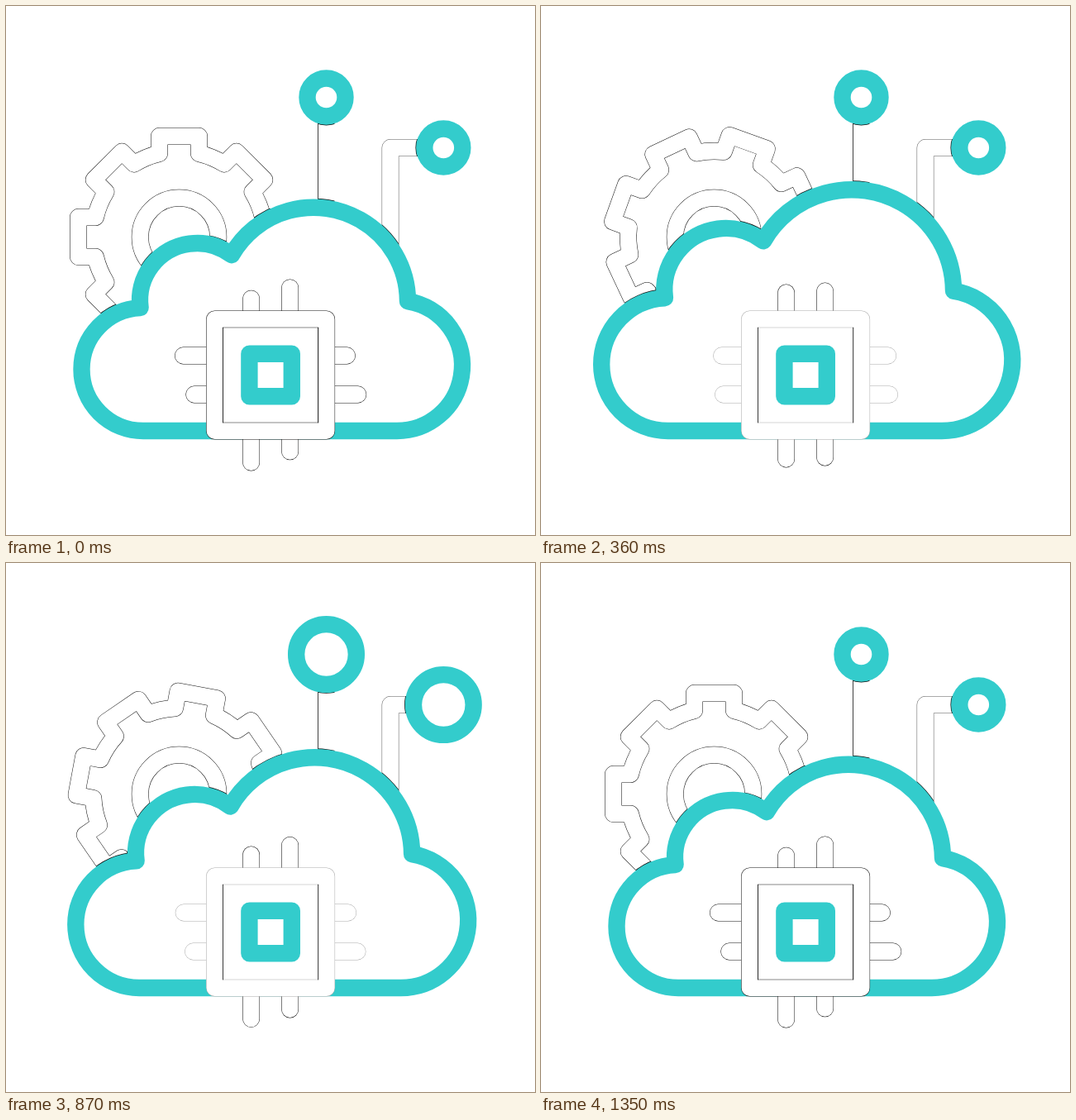
An HTML page with a canvas for the animation above (1410 ms loop, 640 px wide and 640 px high).

```html
<!DOCTYPE html>
<html lang="en">
<head>
<meta charset="utf-8">
<title>Cloud computing</title>
<style>
  html, body { margin: 0; width: 100%; height: 100%; overflow: hidden; background: #fff; }
  canvas { display: block; }
</style>
</head>
<body>
<canvas id="stage" width="640" height="640"></canvas>
<script>
const ctx = document.getElementById('stage').getContext('2d');
const TEAL = '#33cccc', INK = '#111', PALE = '#aaa', WHITE = '#fff';
const LOOP = 1410, STEP = 30, LAST = 1350;
const TAU = Math.PI * 2, QUARTER = TAU / 4;

// Smooth progress from 0 to 1 between two times.
function ease(t, from, to) {
  const k = Math.min(1, Math.max(0, (t - from) / (to - from)));
  return (1 - Math.cos(Math.PI * k)) / 2;
}

// Rises to 1, stays, then falls back to 0.
const swell = (t, up, top, leave, end) => ease(t, up, top) - ease(t, leave, end);

function polyline(...points) {
  const path = new Path2D();
  points.forEach(([x, y]) => path.lineTo(x, y));
  return path;
}

function circle(x, y, r) {
  const path = new Path2D();
  path.arc(x, y, r, 0, TAU);
  return path;
}

function square(half) {
  const path = new Path2D();
  path.rect(-half, -half, 2 * half, 2 * half);
  return path;
}

function stroke(path, color, width) {
  ctx.strokeStyle = color;
  ctx.lineWidth = width;
  ctx.stroke(path);
}

// A white band with a hairline along both edges.
function band(path, color = INK) {
  stroke(path, color, 20.8);
  stroke(path, WHITE, 19.8);
}

// A white shape with a teal border; a dark rim shows only where it overlaps earlier shapes.
function tealShape(path) {
  ctx.globalCompositeOperation = 'source-atop';
  stroke(path, INK, 21.8);
  ctx.globalCompositeOperation = 'source-over';
  ctx.fillStyle = WHITE;
  ctx.fill(path);
  stroke(path, TEAL, 20.4);
}

function gearPath(teeth, root, tip, half) {
  const path = new Path2D(), pitch = TAU / teeth, corner = Math.asin(half / root);
  for (let i = 0; i < teeth; i++) {
    const a = i * pitch, c = Math.cos(a), s = Math.sin(a);
    path.lineTo(tip * c + half * s, tip * s - half * c);
    path.lineTo(tip * c - half * s, tip * s + half * c);
    path.arc(0, 0, root, a + corner, a + pitch - corner);
  }
  path.closePath();
  return path;
}

const gear = gearPath(8, 104, 122, 24);

function drawGear(t) {
  const degrees = 29 * ease(t, 60, 545) - 35 * ease(t, 553, 1165) + 6 * ease(t, 1165, LAST);
  ctx.save();
  ctx.translate(209.5, 279.5);
  band(circle(0, 0, 47.3));
  ctx.rotate(degrees * TAU / 360);
  band(gear);
  ctx.restore();
}

const upLink = polyline([387.5, 262], [387.5, 120]);
const bentLink = polyline([465, 300], [465, 171.5], [510, 171.5]);

// A teal dash that runs along a link from the cloud to its node.
function drawSignal(path, length, t) {
  const head = ease(t, 490, 670), tail = ease(t, 650, 830);
  if (head <= tail) return;
  ctx.setLineDash([length * (head - tail), 999]);
  ctx.lineDashOffset = -length * tail;
  stroke(path, TEAL, 22.5);
  ctx.setLineDash([]);
}

function drawLinks(t) {
  const radius = 23 + 13.4 * swell(t, 650, 880, 930, 1176);
  ctx.lineCap = 'butt';
  stroke(upLink, WHITE, 20);
  stroke(polyline([377.5, 262], [377.5, 120]), INK, 0.8);
  band(bentLink, '#555');
  ctx.lineCap = 'round';
  drawSignal(upLink, 142, t);
  drawSignal(bentLink, 173.5, t);
  tealShape(circle(387.5, 110.5, radius));
  tealShape(circle(529.3, 171.5, radius));
}

// Upper crossing point of two neighbouring circles.
function joint(p, q) {
  const dx = q.x - p.x, dy = q.y - p.y, d = Math.hypot(dx, dy);
  const a = (p.r ** 2 - q.r ** 2 + d ** 2) / (2 * d), h = Math.sqrt(p.r ** 2 - a ** 2);
  return [p.x + (a * dx + h * dy) / d, p.y + (a * dy - h * dx) / d];
}

const lobes = [
  { x: 166, y: 439.5, r: 74.5 },
  { x: 231, y: 356, r: 69 },
  { x: 372, y: 357.7, r: 114 },
  { x: 473, y: 435, r: 79 }
];

function drawCloud(t) {
  const scale = 1 + 0.1165 * swell(t, 60, 545, 553, 1038);
  const path = new Path2D();
  lobes.forEach((lobe, i) => {
    const { x, y, r } = lobe;
    const angleTo = ([px, py]) => Math.atan2(py - y, px - x);
    const from = i > 0 ? angleTo(joint(lobes[i - 1], lobe)) : QUARTER;
    const to = i < lobes.length - 1 ? angleTo(joint(lobe, lobes[i + 1])) : QUARTER;
    path.arc(322 + (x - 322) * scale, 514 + (y - 514) * scale, r * scale, from, to);
  });
  path.closePath();
  tealShape(path);
}

function drawChip(t) {
  const p = swell(t, 20, 220, 220, 435) + swell(t, 455, 680, 680, 900);
  const flatInk = t > 300 && t < 1000 ? PALE : INK;
  const body = square(67.6);
  ctx.save();
  ctx.translate(320.1, 446.5);
  // Each side has one pin that grows and one that shrinks.
  for (let side = 0; side < 4; side++) {
    const color = side % 2 ? flatInk : INK;
    band(polyline([-23.5, 0], [-23.5, -92.4 - 26.5 * p]), color);
    band(polyline([23.5, 0], [23.5, -105.7 + 15.5 * p]), color);
    ctx.rotate(QUARTER);
  }
  ctx.fillStyle = WHITE;
  ctx.fill(body);
  band(body, flatInk);
  for (const x of [-57.6, 57.6]) stroke(polyline([x, -57.5], [x, 57.5]), INK, 0.8);
  stroke(square(25.7), TEAL, 20.4);
  ctx.restore();
}

function draw(t) {
  ctx.clearRect(0, 0, 640, 640);
  ctx.lineJoin = ctx.lineCap = 'round';
  drawGear(t);
  drawLinks(t);
  drawCloud(t);
  drawChip(t);
}

const start = performance.now();

function tick() {
  const t = (performance.now() - start) % LOOP;
  draw(Math.min(Math.floor(t / STEP) * STEP, LAST));
  requestAnimationFrame(tick);
}

tick();
</script>
</body>
</html>
```
